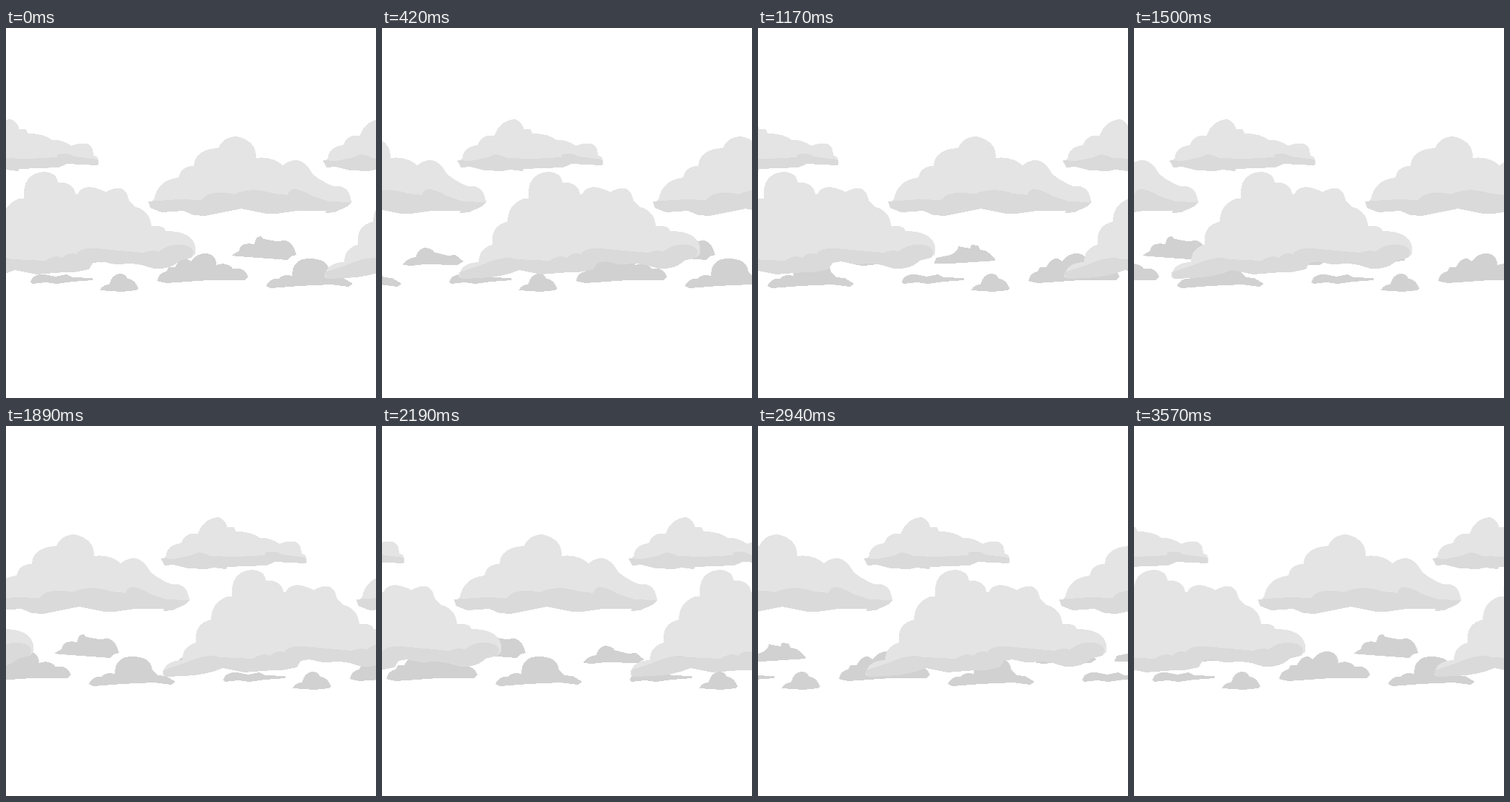
Write an HTML page without scripts that moves like this. It is 512x512 px and loops after 3.6 s.

```html
<!DOCTYPE html>
<html lang="en">
<head>
<meta charset="utf-8">
<title>Drifting clouds</title>
<style>
  html, body { margin: 0; width: 100%; height: 100%; overflow: hidden; background: #fff; }
  svg { display: block; width: 100%; height: 100%; shape-rendering: crispEdges; }
  .top { fill: #e4e4e4; }
  .base { fill: #dadada; }
  .far { fill: #d1d1d1; }
  .drift { animation: drift 3.6s steps(120) infinite; }
  /* One step is 1/121 of the travel, so the loop restarts with a small jump. */
  #back { --travel: 507.77px; }
  #front { --travel: 1523.31px; }
  @keyframes drift { to { transform: translateX(var(--travel)); } }
</style>
</head>
<body>
<svg viewBox="0 0 512 512">
  <defs>
    <g id="farClouds" class="far">
      <path d="M34 352Q36 340 54 341L68 344 84 341 92 345 120 346 120 349 92 351 70 354 55 352 36 354Z"/>
      <path d="M130 363Q134 355 143 355Q147 340 159 340Q167 341 168 347Q178 347 183 360L180 363 160 365Z"/>
      <path d="M209 350Q212 338 222 337L225 331 234 331Q240 318 250 319L256 323Q265 311 277 312Q291 313 291 328Q306 323 314 333Q332 331 335 345L330 349 280 349 222 353Z"/>
      <path d="M312 315L323 308Q324 296 344 299Q345 289 352 288L357 292 374 295 387 294Q398 298 402 314L394 316 390 321 322 316Z"/>
      <path d="M360 357Q365 346 377 347Q384 340 396 343Q396 319 420 319Q446 319 448 338L455 345 467 346 480 354 474 358 450 355 405 357 366 360Z"/>
      <g transform="translate(-118.5)">
        <path d="M88 328Q92 319 106 317Q109 306 118 304Q130 305 131 310L150 315 161 314 172 323 164 328 118 327 100 329Z"/>
        <path d="M197 326L200 318 220 314Q230 309 231 302L247 305 249 300 258 301 261 307 268 308Q282 317 282 322L220 326Z"/>
      </g>
    </g>

    <g id="nearClouds">
      <g id="middle">
        <path class="top" d="M197 243L205 237Q210 210 239 207Q242 191 260 191Q261 168 294 166Q300 151 319 150Q347 156 346 180Q368 177 383 190Q407 172 423 200Q430 209 453 219Q476 216 478 242Z"/>
        <path class="base" d="M197 240L240 237 270 238Q282 223 316 230Q340 219 370 229L390 231Q393 214 425 233L446 240 478 241 472 247 455 255 442 256 443 253 402 253 375 257 360 257 325 250 300 255 275 260 260 259 246 253 215 255 200 249Z"/>
      </g>
      <g id="high" transform="translate(-355.4)">
        <path class="top" d="M282 186L289 180Q290 165 310 162Q315 147 333 149Q341 128 361 126Q372 130 374 140L383 140 386 146Q408 146 419 155Q433 154 446 163Q477 152 476 176L482 179 484 186Z"/>
        <path class="base" d="M282 183L300 184 325 179Q335 171 350 180L385 181 426 179 427 175Q440 171 450 178L482 182 484 187 482 190 440 188 428 193 374 195 372 198 355 196 345 198 319 197 300 192 287 193Z"/>
      </g>
      <g id="large" transform="translate(-220)">
        <path class="top" d="M149 345Q150 325 176 324Q176 305 195 300Q192 273 216 268Q216 245 238 236L245 236Q242 201 273 199Q290 200 292 214L300 214Q315 217 316 230L319 230Q328 212 358 227Q385 212 390 238L398 247Q420 253 421 274Q438 272 441 281Q478 281 482 303L482 312 477 318 400 318 340 316 250 330Z"/>
        <path class="base" d="M149 338L182 327Q212 314 228 320L274 322Q288 313 298 318Q307 309 318 313Q322 302 355 306L411 311Q418 307 432 309Q448 296 470 301Q484 306 476 318L460 322Q450 334 425 333L408 328 395 326 370 327 352 323 340 325 335 334 314 338 300 338 262 341 232 335Q212 344 180 346L152 347Z"/>
      </g>
    </g>
  </defs>

  <g id="back" class="drift">
    <use href="#farClouds" x="512"/>
    <use href="#farClouds"/>
    <use href="#farClouds" x="-512"/>
  </g>
  <g id="front" class="drift">
    <use href="#nearClouds" x="512"/>
    <use href="#nearClouds"/>
    <use href="#nearClouds" x="-512"/>
    <use href="#nearClouds" x="-1024"/>
    <use href="#nearClouds" x="-1536"/>
  </g>
</svg>
</body>
</html>
```
